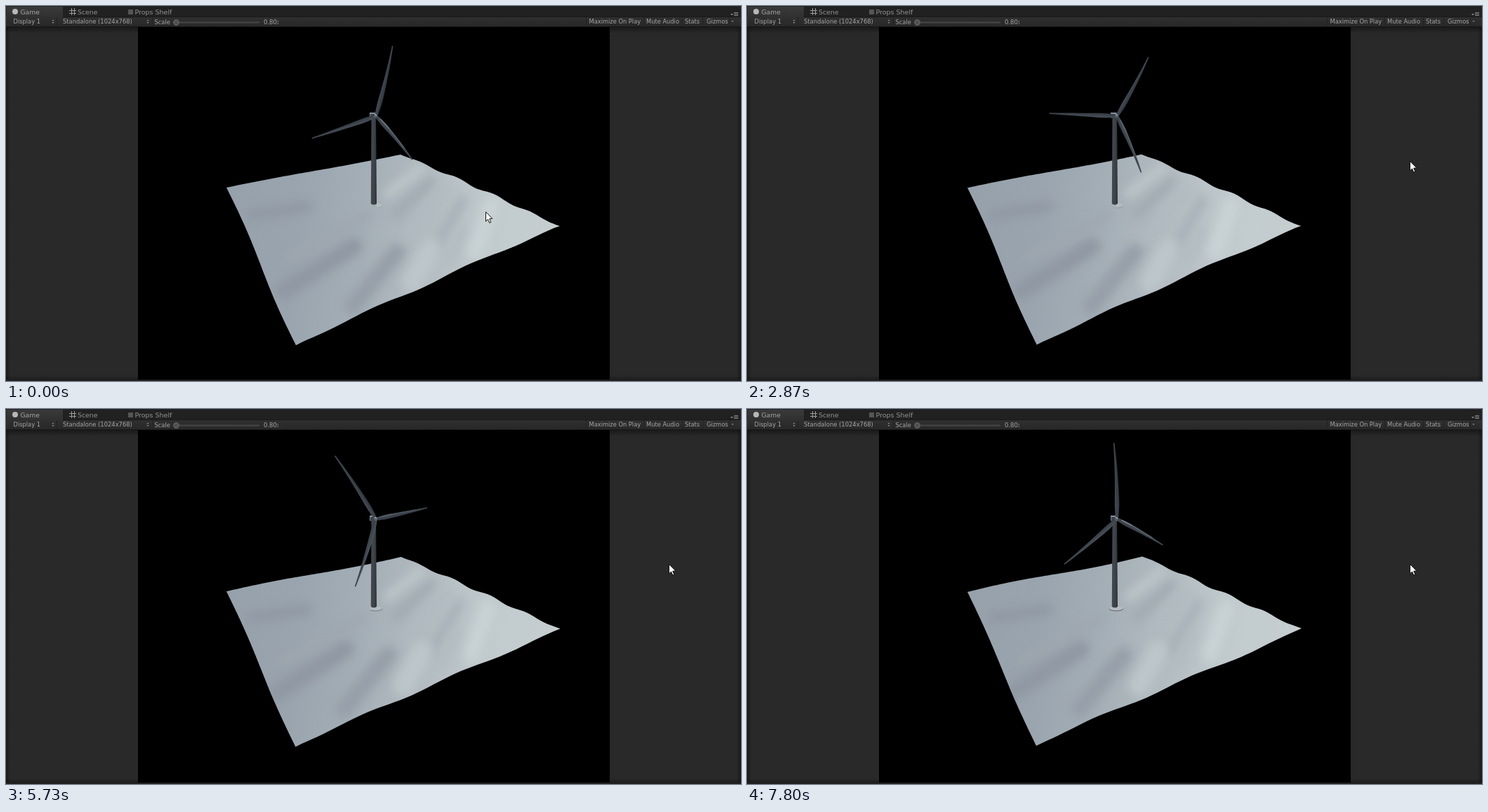
An HTML page with a canvas that plays this animation: 1047 by 535 pixels, repeating every 8000 ms.

```html
<!DOCTYPE html>
<html lang="en">
<head>
<meta charset="utf-8">
<title>Wind turbine</title>
<style>
html, body { margin: 0; width: 100%; height: 100%; overflow: hidden; background: #292929; }
canvas { display: block; }
</style>
</head>
<body>
<canvas id="stage" width="1047" height="535"></canvas>
<script>
const W = 1047, H = 535, LOOP = 8000, STEPS = 23, TAU = Math.PI * 2;
const ctx = document.getElementById('stage').getContext('2d');

const lerp = (a, b, u) => a + (b - a) * u;
const mix = (p, q, u) => p.map((v, i) => lerp(v, q[i], u));
const clamp = v => Math.max(0, Math.min(1, v));

// Turns fall on a 1/15 s grid, four ticks apart, with one tick less every seventh turn later on.
const stepTimes = [2000];
for (let n = 2; n <= STEPS; n++) {
  const ticks = 27 + 4 * n - Math.max(0, Math.floor((n - 8) / 7));
  stepTimes.push(Math.round(ticks * 100 / 15) * 10);
}

function layer(paint) {
  const c = document.createElement('canvas');
  c.width = W;
  c.height = H;
  paint(c.getContext('2d'));
  return c;
}

function polygon(g, pts) {
  g.beginPath();
  pts.forEach(([x, y]) => g.lineTo(x, y));
  g.closePath();
}

function line(g, x1, y1, x2, y2, color, width = 1) {
  g.strokeStyle = color;
  g.lineWidth = width;
  g.beginPath();
  g.moveTo(x1, y1);
  g.lineTo(x2, y2);
  g.stroke();
}

function rect(g, x, y, w, h, color) {
  g.fillStyle = color;
  g.fillRect(x, y, w, h);
}

function disc(g, x, y, r, color) {
  g.fillStyle = color;
  g.beginPath();
  g.arc(x, y, r, 0, TAU);
  g.fill();
}

function ramp(g, x1, y1, x2, y2, ...colors) {
  const grad = g.createLinearGradient(x1, y1, x2, y2);
  colors.forEach((color, i) => grad.addColorStop(i / (colors.length - 1), color));
  return grad;
}

// ---- editor window ----
const chrome = layer(g => {
  const label = (s, x, y, size, color = '#a6a6a6') => {
    g.font = size + 'px "DejaVu Sans", sans-serif';
    g.fillStyle = color;
    g.fillText(s, x, y);
  };
  const triangle = (x, y, w, h) => {
    g.fillStyle = '#858585';
    polygon(g, [[x - w, y], [x + w, y], [x, y + h]]);
    g.fill();
  };

  rect(g, 0, 0, W, H, '#292929');
  rect(g, 0, 0, W, 16, '#212121');
  rect(g, 1, 1, 80, 15, ramp(g, 0, 1, 0, 16, '#3a3a3a', '#303030'));
  rect(g, 0, 15, W, 14, ramp(g, 0, 15, 0, 29, '#303030', '#282828'));
  rect(g, 81, 15, W - 81, 1, '#191919');
  rect(g, 0, 29, W, 1, '#181818');

  const dark = 'rgba(12,12,12,.55)', clear = 'rgba(12,12,12,0)';
  rect(g, 0, 30, W, 9, ramp(g, 0, 30, 0, 39, dark, clear));
  rect(g, 0, 527, W, 8, ramp(g, 0, 535, 0, 527, dark, clear));
  rect(g, 0, 30, 6, 505, ramp(g, 0, 0, 6, 0, dark, clear));
  rect(g, 1041, 30, 6, 505, ramp(g, W, 0, 1041, 0, dark, clear));
  rect(g, 188, 30, 672, 503, '#000');
  rect(g, 0, 533, W, 2, '#202020');

  disc(g, 13, 8, 4, '#b8b8b8');
  for (const d of [93, 97]) {
    line(g, d + .5, 3, d + .5, 13, '#a0a0a0');
    line(g, 90, d - 86.5, 100, d - 86.5, '#a0a0a0');
  }
  rect(g, 174, 5, 7, 7, '#555');
  label('Game', 20.5, 12.3, 9.2);
  label('Scene', 102, 12.3, 9.4, '#929292');
  label('Props Shelf', 183.5, 12.3, 9.5, '#929292');

  label('Display 1', 10.5, 25, 8.3);
  label('Standalone (1024x768)', 81, 25, 8.4);
  label('Scale', 211.5, 26, 8.3);
  label('Maximize On Play', 830.5, 25, 8.3);
  label('Mute Audio', 912, 25, 8.3);
  label('Stats', 967, 25, 8.3);
  label('Gizmos', 998, 25, 8.3);
  g.save();
  g.beginPath();
  g.rect(360, 16, 28, 14);
  g.clip();
  label('0.80x', 367, 26, 8.5);
  g.restore();

  for (const x of [67, 202]) {
    triangle(x, 21.2, 1.7, -2);
    triangle(x, 23, 1.7, 2);
  }
  for (const x of [72.5, 208.5, 826.5, 908.5, 963.5, 992.5, 1030.5]) line(g, x, 16, x, 29, '#222');
  line(g, 240, 23.5, 361, 23.5, '#474747', 2);
  disc(g, 242.5, 23.5, 4.2, '#707070');
  disc(g, 242.5, 23.5, 3.2, '#505050');
  triangle(1035, 21, 1.6, 2);
  triangle(1034, 11, 2, 2.5);
  for (const y of [9.5, 11.5, 13.5]) line(g, 1037, y, 1043, y, '#8a8a8a');
});

// ---- terrain ----
// One side of the sheet: a straight run from p to q, displaced by a wave of its own.
function side(p, q, wave) {
  return Array.from({ length: 48 }, (_, i) => {
    const s = i / 48, [dx, dy] = wave(s);
    return [lerp(p[0], q[0], s) + dx, lerp(p[1], q[1], s) + dy];
  });
}

function outline(u) {
  const left = mix([314, 259], [314, 261], u), top = mix([562, 212], [563, 210.5], u);
  const right = mix([789, 314], [790, 313], u), bottom = mix([413, 484], [412, 480.5], u);
  const fade = s => Math.sqrt(Math.sin(Math.PI * s));
  const ripple = (s, peak, period) => Math.cos(TAU * (s - peak) / period);
  return [
    ...side(left, top, s => [0, -lerp(.6, 1.6, u) * Math.sin(TAU * s)]),
    ...side(top, right, s => [0, fade(s) *
      (lerp(-2.2, -.6, u) - 1.8 * ripple(s, .12 - .05 * u, .235) + 3.5 * s ** 4)]),
    ...side(right, bottom, s => [0, fade(s) *
      (lerp(-2.5, -.5, u) - 2 * ripple(s, .34 + .07 * u, .37) + 6 * u * (.5 - s))]),
    ...side(bottom, left, s => [-lerp(2, 1.3, u) * Math.sin(TAU * s), 0])
  ];
}

// Soft folds: centre x, centre y, length, width, brightness.
const folds = [
  [390, 292, 80, 14, 152],
  [460, 328, 130, 12, 167],
  [445, 375, 120, 24, 152],
  [525, 390, 100, 24, 159],
  [568, 250, 60, 15, 197],
  [580, 274, 70, 12, 168],
  [600, 296, 90, 12, 186],
  [630, 312, 80, 15, 177],
  [592, 370, 55, 30, 198],
  [642, 342, 50, 12, 187],
  [680, 318, 70, 22, 210],
  [728, 315, 35, 34, 204]
];

function paintTerrain(g, u) {
  polygon(g, outline(u));
  g.fillStyle = ramp(g, 320, 285, 785, 325, '#97a1ab', '#9aa4ae', '#a4aeb6', '#b3bcc1', '#c2cbce', '#c6ced0');
  g.fill();
  g.clip();
  g.filter = 'blur(7px)';
  g.lineCap = 'round';
  for (const [cx, cy, length, width, l] of folds) {
    // Folds steepen towards the lower right; the lower ones drift left.
    const tilt = (8 + (cx + .8 * (cy - 290) - 390) * .2) * Math.PI / 180;
    const x = cx - 20 * u * clamp((cy - 290) / 60);
    const dx = Math.cos(tilt) * length / 2, dy = Math.sin(tilt) * length / 2;
    const blue = Math.round(l + 2 + (210 - l) * .15);
    line(g, x - dx, cy + dy, x + dx, cy - dy, `rgb(${l - 9},${l},${blue})`, width);
  }
  g.filter = 'none';
}
const terrains = Array.from({ length: 6 }, (_, i) => layer(g => paintTerrain(g, i / 5)));

// ---- turbine ----
const hub = [527, 157];
const STEP_ANGLE = 4.38 * Math.PI / 180;

// A circle seen in perspective.
function tipAt(angle) {
  const s = Math.sin(angle), c = Math.cos(angle);
  const depth = 1 + .155 * s - .01 * c;
  return [528 + (79.7 * s + 22.5 * c) / depth, 156.7 + (25 * s - 99 * c) / depth];
}

function blade(angle) {
  const [tx, ty] = tipAt(angle);
  const dx = tx - hub[0], dy = ty - hub[1], len = Math.hypot(dx, dy);
  const nx = -dy / len, ny = dx / len;
  const at = (u, shift) => {
    const half = lerp(4, .8, u) * Math.min(1, .5 + 2.5 * u);
    return [hub[0] + dx * u + 6 * u * (1 - u) + nx * half * shift, hub[1] + dy * u + ny * half * shift];
  };
  const stops = Array.from({ length: 13 }, (_, i) => i / 12);
  polygon(ctx, [...stops.map(u => at(u, -1)), ...stops.reverse().map(u => at(u, 1))]);
  ctx.fillStyle = ramp(ctx, hub[0] - nx * 4, hub[1] - ny * 4, hub[0] + nx * 4, hub[1] + ny * 4,
    '#4a525b', '#3d444c', '#33383f');
  ctx.fill();

  // Light catches blades that point right and slightly down.
  ctx.globalAlpha = .65 * Math.max(0, Math.cos(Math.atan2(dy, dx) - .5)) ** 3;
  line(ctx, ...at(.08, -.6), ...at(.3, -.6), '#9aa6b2', 1.3);
  line(ctx, ...at(.3, -.6), ...at(.75, -.6), '#6b7681', 1.3);
  ctx.globalAlpha = 1;
}

function footing(u) {
  ctx.save();
  ctx.beginPath();
  ctx.rect(lerp(528, 514, u), 275, 30, 20);
  ctx.clip();
  ctx.lineWidth = 1;
  ctx.fillStyle = '#b4bbc1';
  ctx.strokeStyle = `rgba(78,84,92,${lerp(.15, .85, u)})`;
  ctx.beginPath();
  ctx.ellipse(526, 284.5, 10, 3.2, 0, 0, TAU);
  ctx.fill();
  ctx.beginPath();
  ctx.ellipse(526, 284.8, 10, 3.2, 0, 0, Math.PI);
  ctx.stroke();
  ctx.restore();
}

function turbine(step) {
  footing(step / STEPS);
  rect(ctx, 518, 152, 9, 8, '#3c434c');
  line(ctx, 518, 153, 526, 153, '#a9b4c2', 1.4);
  line(ctx, 518.5, 153, 518.5, 159, '#77838f');

  ctx.fillStyle = ramp(ctx, 520, 0, 528, 0, '#41474e', '#3e444a', '#2d3237');
  ctx.beginPath();
  ctx.moveTo(520.5, 158);
  ctx.lineTo(527, 158);
  ctx.lineTo(528, 282);
  ctx.quadraticCurveTo(524, 285, 519.8, 282);
  ctx.fill();

  for (let k = 0; k < 3; k++) blade(step * STEP_ANGLE + k * TAU / 3);
  disc(ctx, 526.5, 157, 2.6, '#545d68');
  line(ctx, 525, 154.5, 528, 156, '#b3bdc9', 1.3);
}

// ---- pointer ----
function pointer(t) {
  const u = clamp(Math.floor((t - 1200) / 65 + 1) / 3);
  ctx.save();
  ctx.translate(...mix([683.5, 293.8], [944.5, 221.5], u));
  polygon(ctx, [[0, 0], [0, 13.5], [3, 10.6], [5.2, 15.6], [7.4, 14.7], [5.2, 9.8], [9.3, 9.5]]);
  ctx.fillStyle = '#fff';
  ctx.fill();
  ctx.strokeStyle = '#111';
  ctx.lineWidth = 1;
  ctx.stroke();
  ctx.restore();
}

function render(t) {
  const step = stepTimes.filter(v => v <= t).length;
  ctx.drawImage(chrome, 0, 0);
  ctx.drawImage(terrains[Math.floor(step / 4)], 0, 0);
  turbine(step);
  pointer(t);
}

const start = performance.now();
function tick() {
  render((performance.now() - start) % LOOP);
  requestAnimationFrame(tick);
}
tick();
</script>
</body>
</html>
```
